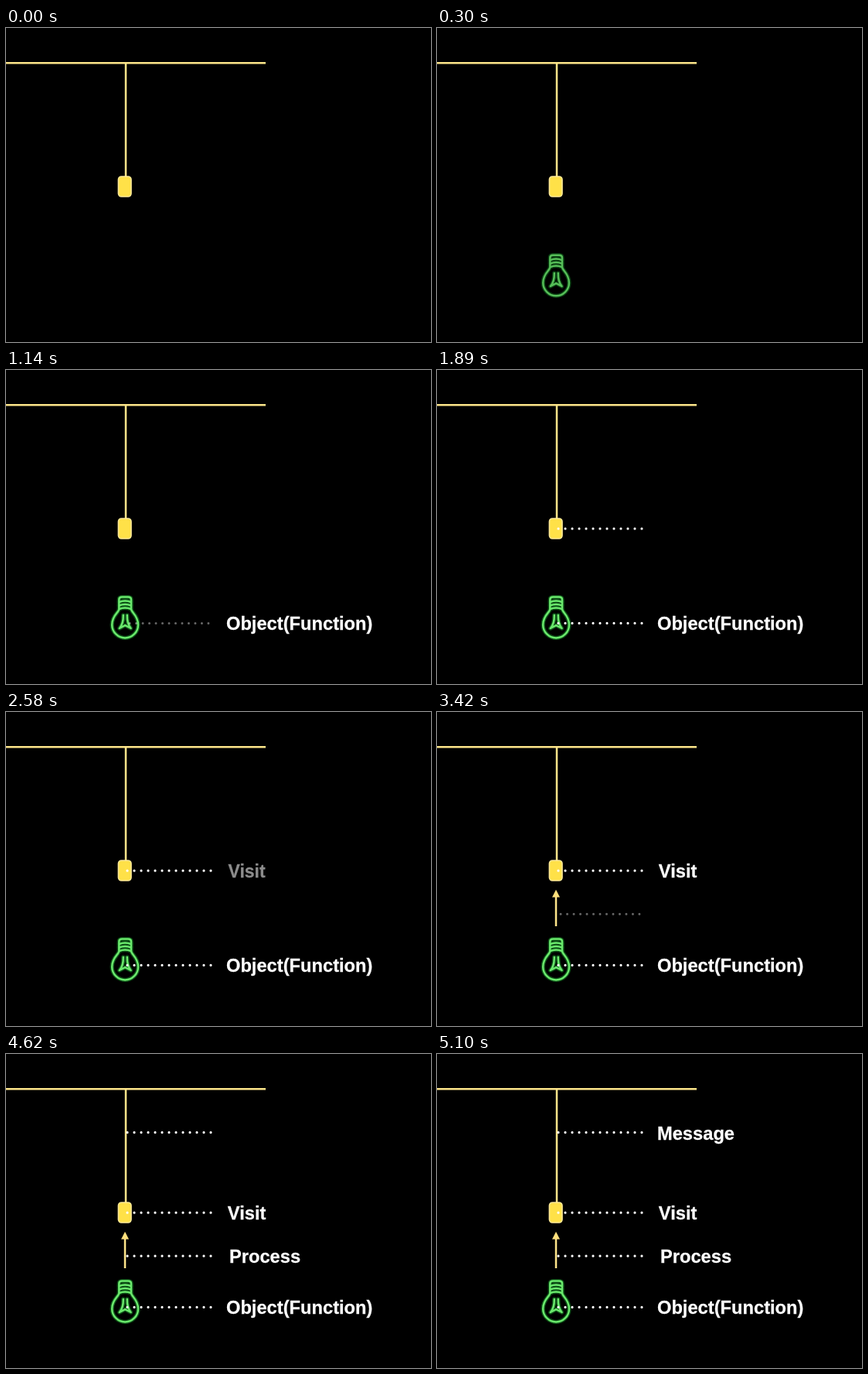
Animation of 550x406 px, one loop 5130 ms. Source, as an HTML page:

```html
<!DOCTYPE html>
<html lang="en">
<head>
<meta charset="utf-8">
<title>Light switch diagram</title>
<style>
  /* One clock in ms; every part derives its pose from it. */
  @property --t { syntax: "<number>"; inherits: true; initial-value: 0; }
  @keyframes clock { from { --t: 0; } to { --t: 5130; } }

  html, body { margin: 0; width: 100%; height: 100%; overflow: hidden; background: #000; }
  svg { display: block; width: 100%; height: 100%; animation: clock 5130ms linear infinite; }

  /* --at: start of the build in ms */
  .pop {
    --p: clamp(0, (var(--t) - var(--at)) / 330, 1);
    opacity: calc(var(--p) * (.6 + .4 * var(--p)));
    transform: scale(calc(1 - .23 * (1 - var(--p)) * (1 - var(--p))));
    transform-box: fill-box;
    transform-origin: center;
  }
  text {
    font: bold 23.7px "Liberation Sans", Arial, Helvetica, sans-serif;
    fill: #fff;
    stroke: #fff;
    stroke-width: .3;
    text-anchor: middle;
  }
  .dots { stroke: #fff; stroke-width: 3.2; stroke-linecap: round; stroke-dasharray: 0 9; }
  .cord { stroke: #fde58a; stroke-width: 2.5; fill: none; }
  .bulb { fill: none; stroke-linecap: round; stroke-linejoin: round; }
  .glow { stroke: #0f5a1a; stroke-width: 5.4; opacity: .85; }
  .tube { stroke: #6ae86c; stroke-width: 2.5; }
</style>
</head>
<body>
<svg viewBox="0 0 550 406">
  <defs>
    <g id="bulb">
      <path d="M146.3 309V297Q146.3 293.6 150 293.6H158.2Q162 293.6 162 297V309
               C162 313.5 171 317 171 329.5A16.9 16.9 0 0 1 137.2 329.5
               C137.2 317 146.3 313.5 146.3 309"/>
      <path d="M146.5 300Q154 297 161.8 300M146.5 304.5Q154 301.5 161.8 304.5M146.5 309Q154 306 161.8 309"/>
      <path d="M151.8 317C152 326 150 330.5 146.8 334L154.2 330.2L161.6 334C158.5 330.5 156.6 326 156.8 317"/>
    </g>
  </defs>

  <path class="cord" d="M0 45.3H336M155 45V193"/>
  <rect x="145.4" y="192" width="16.6" height="26" rx="4" fill="#ffe148" stroke="#ffea98" stroke-width="1.6"/>

  <g class="pop bulb" style="--at:15">
    <use href="#bulb" class="glow"/>
    <use href="#bulb" class="tube"/>
  </g>
  <text class="pop" style="--at:510" x="379.7" y="336">Object(Function)</text>
  <path class="pop dots" style="--at:975" d="M157 327.4H265.2"/>

  <path class="pop dots" style="--at:1575" d="M157 205.2H265.2"/>
  <text class="pop" style="--at:2370" x="311.6" y="214">Visit</text>

  <g class="pop" style="--at:2805">
    <path class="cord" d="M154 277V238"/>
    <path d="M154 229.8L159 239.6H149Z" fill="#ffe07c"/>
  </g>
  <path class="pop dots" style="--at:3255" d="M157 261.2H265.2"/>
  <text class="pop" style="--at:3810" x="335" y="270">Process</text>

  <path class="pop dots" style="--at:4275" d="M157 101.4H265.2"/>
  <text class="pop" style="--at:4755" x="335" y="111">Message</text>
</svg>
</body>
</html>
```
